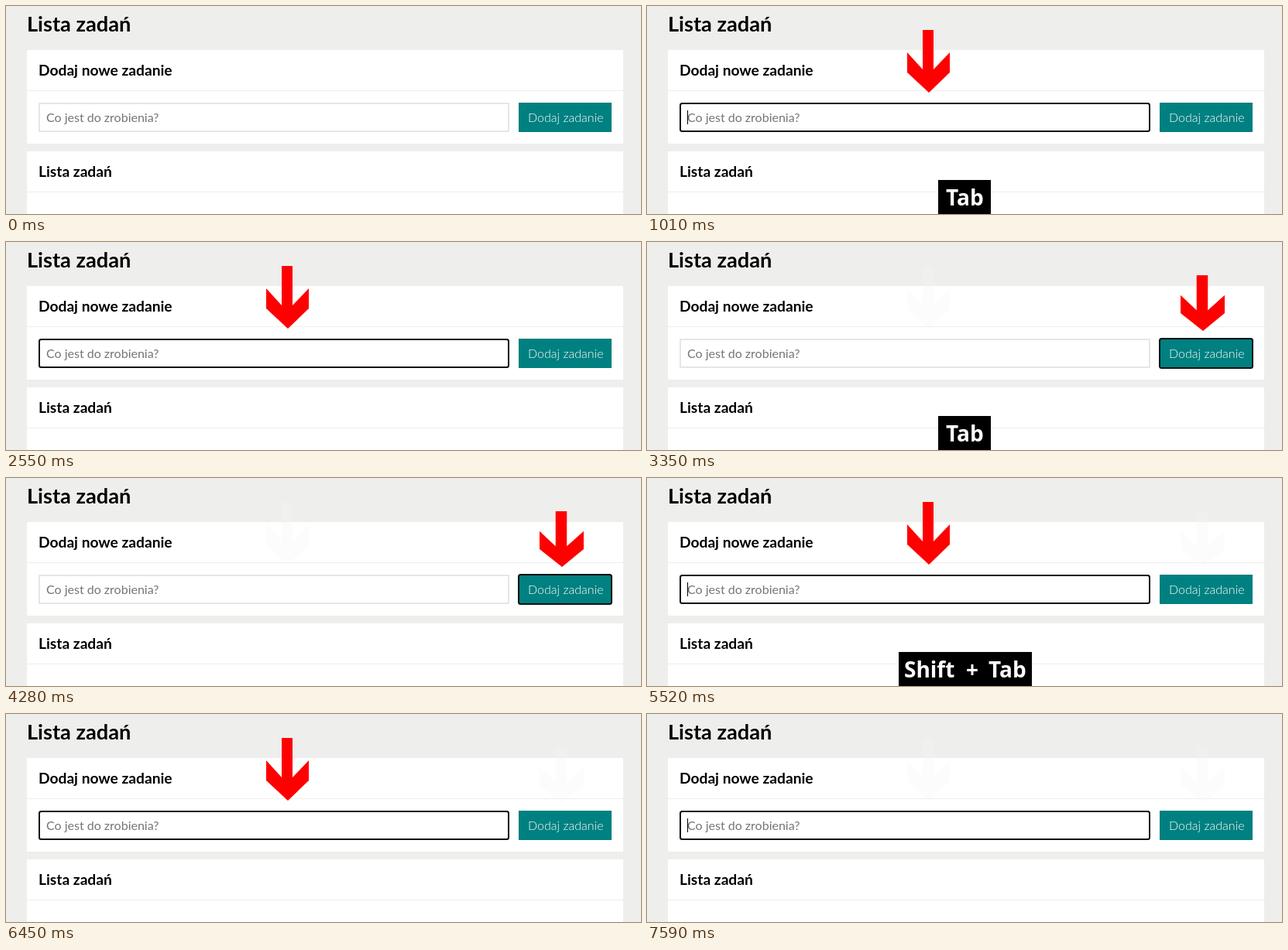
These frames come from a looping animation (820 by 269 pixels, 8.05 s). An HTML page:

```html
<!DOCTYPE html>
<html lang="pl">
<head>
<meta charset="utf-8">
<title>Lista zadań</title>
<style>
html, body { margin: 0; width: 100%; height: 100%; overflow: hidden; background: #eeeeec; }
svg { display: block; }
text { font: 16px Lato, sans-serif; }
.h1 { font-size: 27.2px; font-weight: bold; }
.h2 { font-size: 19.2px; font-weight: bold; }
.hint { fill: #757575; }
.button { fill: #fff; font-weight: 300; }
.key text { font: bold 28px "Open Sans", "Noto Sans", sans-serif; fill: #fff; }
.ring { fill: none; stroke: #101010; stroke-width: 2; }
.arrow { fill: #f00; }
.arrow.faded { fill: rgba(245, 245, 245, .3); }
</style>
</head>
<body>
<svg width="820" height="269" viewBox="0 0 820 269">
  <defs>
    <path id="arrow" d="M20 0H34V51L55 29V55L28 81L0 55V29L20 51Z"/>
  </defs>
  <path fill="#fff" d="M27 57H797V178H27ZM27 188H797V269H27Z"/>
  <path fill="#eee" d="M27 109H797V110H27ZM27 240H797V241H27Z"/>
  <text class="h1" x="27" y="33">Lista zadań</text>
  <text class="h2" x="42" y="90">Dodaj nowe zadanie</text>
  <text class="h2" x="42" y="221">Lista zadań</text>

  <rect x="43" y="126" width="606" height="36" fill="#fff" stroke="#e6e6e6" stroke-width="2"/>
  <text class="hint" x="52" y="150">Co jest do zrobienia?</text>
  <rect x="662" y="125" width="120" height="38" fill="#008080"/>
  <text class="button" x="674" y="150">Dodaj zadanie</text>

  <g id="inputFocus">
    <rect class="ring" x="43" y="126" width="606" height="36" rx="2.5"/>
  </g>
  <rect id="caret" x="52" y="135" width="1" height="18"/>
  <rect id="buttonFocus" class="ring" x="662" y="125" width="120" height="38" rx="2.5"/>

  <use id="inputArrow" class="arrow" href="#arrow" transform="translate(336 31)"/>
  <use id="buttonArrow" class="arrow" href="#arrow" transform="translate(689 43) scale(1.036 .889)"/>

  <g id="tab" class="key">
    <rect x="376" y="225" width="68" height="44"/>
    <text x="386" y="258">Tab</text>
  </g>
  <g id="shiftTab" class="key">
    <rect x="325" y="225" width="172" height="44"/>
    <text x="332" y="258">Shift</text>
    <text x="412" y="258">+</text>
    <text x="441" y="258">Tab</text>
  </g>
</svg>
<script>
const LOOP = 8050, TO_INPUT = 1010, TO_BUTTON = 3350, BACK = 5520, HIDE_ARROW = 7040;
const $ = id => document.getElementById(id);
const show = (id, on) => $(id).style.display = on ? "" : "none";

function setArrow(id, active, faded) {
  show(id, active || faded);
  $(id).classList.toggle("faded", !active);
}

function draw(t) {
  const within = (from, to) => t >= from && t < to;
  const onButton = within(TO_BUTTON, BACK);
  const onInput = t >= TO_INPUT && !onButton;

  show("inputFocus", onInput);
  show("buttonFocus", onButton);
  show("caret", within(TO_INPUT, 1540) || within(2070, 2550) ||
    within(BACK, 6050) || within(6580, 7110) || t >= 7590);

  setArrow("inputArrow", onInput && t < HIDE_ARROW, onButton || t >= HIDE_ARROW);
  setArrow("buttonArrow", onButton, t >= BACK);

  show("tab", within(TO_INPUT, 1940) || within(TO_BUTTON, 4280));
  show("shiftTab", within(BACK, 6450));
}

const start = performance.now();
function tick() {
  draw((performance.now() - start) % LOOP);
  requestAnimationFrame(tick);
}
tick();
</script>
</body>
</html>
```
